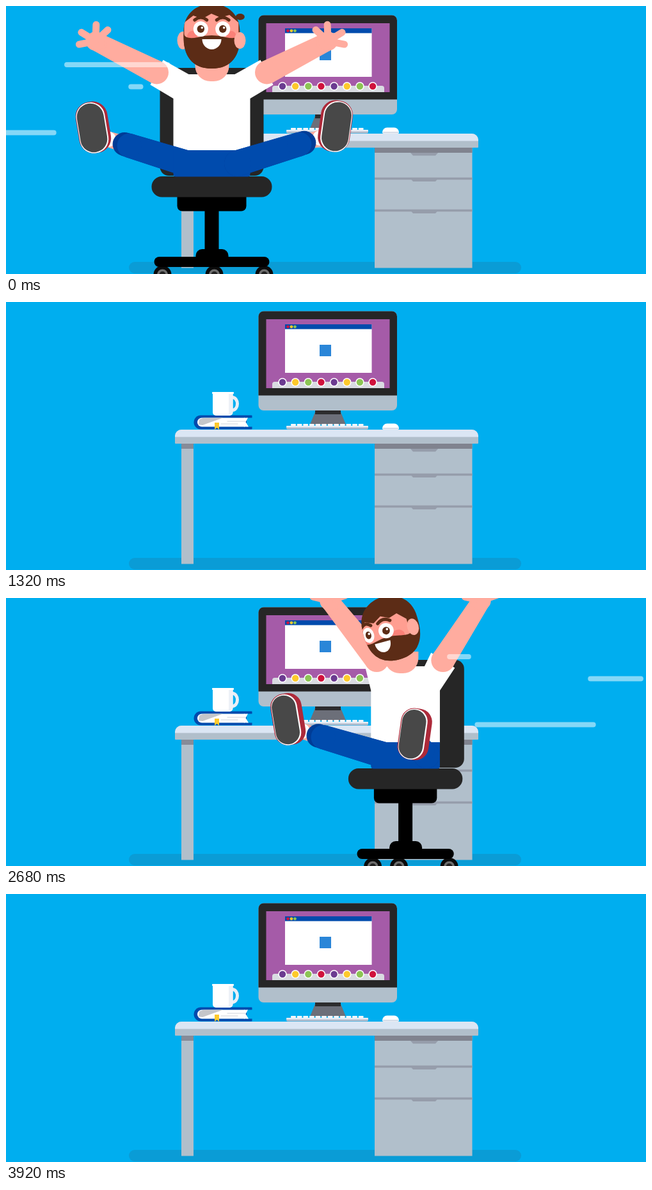
Recreate the animation shown at these times as an HTML page with a canvas. Size 1000x420 px, loop 4000 ms.

```html
<!DOCTYPE html>
<html lang="en">
<head>
<meta charset="utf-8">
<title>Office chair ride</title>
<style>
html, body { margin: 0; width: 100%; height: 100%; overflow: hidden; background: #00aeef; }
canvas { display: block; width: 1000px; height: 420px; }
</style>
</head>
<body>
<canvas id="stage" width="1000" height="420"></canvas>
<script>
const c = document.getElementById('stage').getContext('2d');
const LOOP = 4000, STEP = 40, SPEED = 0.68, SPIN = 0.43, START = 321.5;
const SKIN = '#ffac9f', FACE = '#ff9e91', CHEEK = '#fb8178', HAIR = '#5c2c16';
const JEANS = '#004bad', CUFF = '#003c96', DARK = '#262626', STEEL = '#b1bfcb', EDGE = '#969dab';
const PURPLE = '#6b3b90', YELLOW = '#fdc92c', GREEN = '#8cc454', RED = '#d0123c', SHOE = '#ad2a3a';

// Speed lines, placed relative to the chair
const LINES = [
  { y: 92, start: -157, life: 258, period: 660, from: -380, to: -65 },
  { y: 126.5, start: 30, life: 520, period: 520, from: -380, to: -107 },
  { y: 198.5, start: -40, life: 430, period: 640, from: -340, to: -52 }
];

const rad = d => d * Math.PI / 180;
const mod = (a, b) => ((a % b) + b) % b;

function box(x, y, w, h, r, fill) {
  c.beginPath(); c.roundRect(x, y, w, h, r); c.fillStyle = fill; c.fill();
}
function oval(x, y, rx, ry, fill) {
  c.beginPath(); c.ellipse(x, y, rx, ry, 0, 0, 7); c.fillStyle = fill; c.fill();
}
const disc = (x, y, r, fill) => oval(x, y, r, r, fill);
function poly(pts, fill) {
  c.beginPath(); pts.forEach(p => c.lineTo(...p)); c.closePath(); c.fillStyle = fill; c.fill();
}
function line(x1, y1, x2, y2, w, color) {
  c.beginPath(); c.moveTo(x1, y1); c.lineTo(x2, y2);
  c.lineWidth = w; c.strokeStyle = color; c.lineCap = 'round'; c.stroke();
}
function limb(x1, y1, w1, x2, y2, w2, color) {
  const d = Math.hypot(x2 - x1, y2 - y1) || 1, nx = (y1 - y2) / d / 2, ny = (x2 - x1) / d / 2;
  poly([[x1 + nx * w1, y1 + ny * w1], [x2 + nx * w2, y2 + ny * w2],
    [x2 - nx * w2, y2 - ny * w2], [x1 - nx * w1, y1 - ny * w1]], color);
  disc(x1, y1, w1 / 2, color);
  disc(x2, y2, w2 / 2, color);
}

function drawDesk() {
  box(192, 401, 613, 18, 9, '#0a9cd6');
  box(274, 222, 19, 188.5, 0, STEEL);
  box(274, 222, 19, 8, 0, '#868b98');
  box(576, 222, 152.5, 188.5, 0, STEEL);
  box(576, 222, 152.5, 8, 0, '#80838f');
  for (const y of [230, 270.5, 320.5]) {
    if (y > 230) box(576, y - 1.7, 152.5, 3.4, 0, EDGE);
    poly([[632, y], [675, y], [671, y + 4.5], [636, y + 4.5]], EDGE);
  }
  box(264, 200, 474, 22, [10, 10, 1, 1], STEEL);
  box(264, 200, 474, 11.5, [10, 10, 0, 0], '#dbe6f4');
}

function drawComputer() {
  poly([[484, 170], [522, 170], [531, 192], [475, 192]], '#6c6f79');
  box(483, 170, 40, 6, 0, '#2c2c2e');
  box(394.5, 14.5, 216.5, 155.5, 8, STEEL);
  box(394.5, 14.5, 216.5, 132, [8, 8, 0, 0], DARK);
  box(406.5, 27, 193, 108, 0, '#a55ba8');
  box(436, 35, 135.5, 76, 0, '#fff');
  box(436, 35, 135.5, 7.5, 0, JEANS);
  [RED, YELLOW, GREEN].forEach((f, i) => disc(440.5 + i * 5.5, 38.8, 2.4, f));
  box(490, 67, 18, 18, 0, '#2a86d8');
  box(416, 125, 175, 10, [4, 4, 0, 0], '#d9dbe1');
  for (let i = 0; i < 8; i++) {
    const x = 432 + i * 20.15;
    disc(x, 125.8, 6.8, '#fff');
    disc(x, 125.8, 5.2, [PURPLE, YELLOW, GREEN, RED][i % 4]);
  }
  box(438, 194, 128, 5.5, 2, '#b5bccb');
  box(438, 194, 128, 2.5, 1, '#e7edf6');
  for (let i = 0; i < 12; i++) box(445 + i * 9.6, 191, 8, 3, 1, '#f4f7fb');
  box(588, 190.5, 26, 9.5, [11, 11, 3, 3], '#fff');
  box(589, 197, 24, 2.5, 1, '#d5dce8');
}

function drawBook() {
  box(293.5, 177.5, 91, 22, [11, 1, 1, 11], JEANS);
  box(376, 181.5, 9, 14, 0, '#00aeef');
  box(299, 181.5, 74, 14, [7, 0, 0, 7], '#fff');
  poly([[372, 181.5], [378, 181.5], [374.5, 188], [379, 195.5], [372, 195.5]], '#fff');
  poly([[302, 184], [309, 181.5], [339, 181.5], [307, 193], [301, 192]], '#c4c6ca');
  line(346, 187, 374, 187, 1.3, '#dfe2e8');
  line(336, 191, 362, 191, 1.3, '#dfe2e8');
  poly([[326, 189], [333, 189], [333, 200], [329.5, 197], [326, 200]], YELLOW);
  c.beginPath(); c.ellipse(354, 159.5, 7.5, 10, 0, 0, 7);
  c.lineWidth = 5; c.strokeStyle = '#e9eef6'; c.stroke();
  box(323, 141, 31.5, 37, [1, 1, 5, 5], '#fff');
  box(348, 143, 6.5, 34, [1, 1, 5, 1], '#edf1f7');
  box(322, 141, 34, 3, 1, '#fff');
}

// Body measures for a turn of a radians away from the viewer, facing left
function pose(a) {
  const k = Math.cos(a), s = Math.sin(a);
  const wide = k ** 6, nod = Math.sin(2 * a), lean = Math.max(0, nod), snap = k ** 15;
  const arm = side => ({
    side,
    x: side * (36 + 50 * wide) + 9 * k * lean, y: 104 - 20 * s * s,
    hx: side * (88 + 90 * wide), hy: 57 - 103 * s * s - 18 * nod
  });
  const farX = -187 + 380 * Math.max(0, -snap), sole = 42 - 8 * s;
  return {
    k, s, wide, lean, away: k < -0.1,
    half: 51 + 9 * wide,
    headX: -24 * nod,
    turn: a * 180 / Math.PI - 40 * s ** 8,
    arms: [arm(-1), arm(1)],
    far: { x: farX, y: 191 - 36 * Math.min(0, nod), tilt: farX * 0.05, sole, edge: 4 + 6 * s, hip: -40 * k },
    near: { x: 195 * snap, y: 189 + 76 * s * s, tilt: 8, sole, edge: 8 - 12 * snap, hip: 40 * k }
  };
}

function drawBase({ k, s, wide }) {
  const seat = 87 + 7 * wide, mount = seat - 40, foot = 69 + 21 * wide;
  box(-11, 318, 22, 70, 0, '#000');
  box(-mount, 296, mount * 2, 25.5, [0, 0, 8, 8], '#000');
  box(-25, 381, 51, 20, [10, 10, 0, 0], '#000');
  for (const x of [46 * s - 77, 4 - 25 * s, 82 - 24 * s]) {
    const wx = k < 0 ? -x : x;
    disc(wx, 421, 14, '#0b0b0b');
    disc(wx, 421, 8.5, '#6d6d6d');
    disc(wx, 421, 5, '#222');
  }
  box(-foot, 393, foot * 2, 16, 8, '#000');
  box(-seat, 267, seat * 2, 32.5, 16, DARK);
}

function drawBack({ k, s }) {
  const half = Math.max(14, 81 * Math.abs(k));
  box(44 * s - half, 97, half * 2, 169, 14, DARK);
}

function drawArm({ x, y, hx, hy, side }, away) {
  const dir = Math.atan2(hy - y, hx - x);
  limb(x, y, 37, hx, hy, 29, SKIN);
  const px = hx + Math.cos(dir) * 4, py = hy + Math.sin(dir) * 4;
  disc(px, py, 15, SKIN);
  for (const d of [110, 65, 5, -38]) {
    const g = dir - side * rad(d);
    line(px, py, px + Math.cos(g) * 26, py + Math.sin(g) * 26, 11, SKIN);
  }
  if (away) limb(x, y, 41, x + (hx - x) * 0.12, y + (hy - y) * 0.12, 40, '#fff');
}

function drawTorso({ half, arms, headX }) {
  for (const { x, y, hx, hy, side } of arms) {
    const dir = Math.atan2(hy - y, hx - x), nx = -Math.sin(dir) * 22 * side, ny = Math.cos(dir) * 22 * side;
    poly([[side * half, 145], [x + nx, y + ny], [x - nx, y - ny], [side * (half - 24), 107], [0, 145]], '#fff');
  }
  box(-half, 107, half * 2, 121, [24, 24, 0, 0], '#fff');
  box(headX * 0.3 - 26, 84, 53, 34, [0, 0, 24, 24], SKIN);
}

function drawLeg({ x, y, tilt, sole, edge, hip }, away) {
  const dx = hip - x, dy = 246 - y, d = Math.hypot(dx, dy) || 1;
  const along = n => [x + dx * n / d, y + 10 + (dy - 10) * n / d];
  const reach = Math.min(54, d * 0.5);
  limb(...along(reach * 0.3), 24, ...along(reach), 26, SKIN);
  limb(...along(reach * 0.2), 25, ...along(reach * 0.5), 24, '#fff');
  limb(hip, 246.5, 41, ...along(reach), 37, CUFF);
  limb(hip, 246.5, 41, ...along(reach + 8), 38, JEANS);
  c.save();
  c.translate(x, y);
  c.rotate(rad(tilt));
  box(Math.min(0, edge) - sole / 2 - 2, -41, sole + 4 + Math.abs(edge), 81, sole / 2 + 2, SHOE);
  if (!away) {
    box(-sole / 2 - 1.5 + edge * 0.1, -40, sole + 3, 80, sole / 2 + 1, '#fff');
    box(-sole / 2, -38.5, sole, 77, sole / 2, '#484848');
  }
  c.restore();
}

function drawLegs({ half, far, near, away }) {
  const lap = () => box(-half, 226, half * 2, 41.5, [0, 0, 4, 4], JEANS);
  drawLeg(away ? near : far, away);
  if (!away) lap();
  drawLeg(away ? far : near, away);
  if (away) lap();
}

function drawEye(x, k, squint) {
  if (squint) {
    oval(x, -4, 9 * k, 4.5, '#fff');
    oval(x, -3, 4 * k, 2, HAIR);
  } else {
    oval(x, -12, 12 * k, 12, '#fff');
    oval(x, -12, 6 * k, 6, HAIR);
    disc(x + 2 * k, -14, 1.8, '#fff');
  }
  const y = squint ? -17 : -26;
  c.beginPath(); c.moveTo(x - 10 * k, y);
  c.quadraticCurveTo(x, y - 8, x + 10 * k, y);
  c.lineWidth = 5; c.lineCap = 'round'; c.strokeStyle = HAIR; c.stroke();
}

function drawHead({ headX, turn, lean }, squint) {
  const px = d => 44 * Math.sin(rad(Math.max(-100, Math.min(100, d - turn))));
  const seen = d => Math.cos(rad(d - turn));
  const edge = d => d - turn < -90 ? -50 : px(d);
  c.save();
  c.translate(headX, 48);
  c.rotate(rad(-16 * lean));
  if (turn < 60) oval(px(70) + 3, -31, 7, 5, HAIR);
  if (seen(-90) > -0.1) oval(px(-90) - 1, 6, 9, 14, SKIN);
  c.save();
  c.beginPath();
  c.moveTo(-44, -8);
  c.bezierCurveTo(-44, -66, 44, -66, 44, -8);
  c.bezierCurveTo(46, 26, 34, 50, 0, 50);
  c.bezierCurveTo(-34, 50, -46, 26, -44, -8);
  c.fillStyle = HAIR; c.fill(); c.clip();
  c.translate(0, 14 * lean);
  if (turn < 165) {
    const l = edge(-78), r = edge(72), w = r - l;
    const fringe = [-22, -33, -28, -36, -30, -34, -22].map((y, i) => [l + w * i / 6, y]);
    poly([...fringe, [r, 12], [l, 12]], FACE);
    for (const d of [-44, 44]) if (seen(d) > 0) oval(px(d), 0, 11 * Math.max(0.4, seen(d)), 9, CHEEK);
    const b = edge(-82), e = edge(82);
    c.beginPath();
    c.moveTo(b, -4);
    c.quadraticCurveTo(b + 3, 5, b + (e - b) * 0.25, 1);
    c.quadraticCurveTo((b + e) / 2, -5, b + (e - b) * 0.75, 1);
    c.quadraticCurveTo(e - 3, 5, e, -4);
    c.lineTo(e, 60); c.lineTo(b, 60); c.fillStyle = HAIR; c.fill();
    for (const d of [-23, 23]) {
      if (seen(d) > -0.15) drawEye(px(d), Math.max(0.4, Math.sqrt(Math.max(0, seen(d)))), squint);
    }
    if (seen(0) > 0.1) {
      c.beginPath();
      c.ellipse(px(0) * 0.75, 4, 15 * Math.max(0.7, seen(0)), 16, 0, 0, Math.PI);
      c.fillStyle = '#fff'; c.fill();
    }
  }
  c.restore();
  if (seen(90) > -0.1) oval(px(90) - 3 * lean, 6, 9, 13, SKIN);
  c.restore();
}

function drawLines(time) {
  for (const { y, start, life, period, from, to } of LINES) {
    const p = mod(time - start, period) / life;
    if (p >= 1) continue;
    const head = from + (to - from) * (1 - (1 - Math.min(1, p * 2)) ** 2);
    const tail = from + (to - from) * p ** 1.5;
    if (head - tail > 2) box(tail, y - 4, head - tail, 8, 4, 'rgba(255,255,255,.52)');
  }
}

function drawMan(p, squint) {
  if (p.away) drawLegs(p);
  drawBase(p);
  if (!p.away) drawBack(p);
  drawTorso(p);
  p.arms.forEach(arm => drawArm(arm, p.away));
  if (!p.away) drawLegs(p);
  drawHead(p, squint);
  if (p.away) drawBack(p);
}

function ride(time) {
  const turn = mod(SPIN * time + 180, 360) - 180;
  c.save();
  c.translate(START + SPEED * time, 0);
  c.save();
  if (turn > 0) c.scale(-1, 1);
  drawMan(pose(rad(Math.abs(turn))), time > 400);
  c.restore();
  drawLines(time);
  c.restore();
}

function draw(t) {
  box(0, 0, 1000, 420, 0, '#00aeef');
  drawDesk();
  drawComputer();
  drawBook();
  if (t < 1320) ride(t);
  else if (t >= 1800 && t < 3920) {
    c.save();
    c.translate(1000, 0);
    c.scale(-1, 1);
    ride(t - 2600);
    c.restore();
  }
}

function tick() {
  draw(Math.floor(performance.now() % LOOP / STEP) * STEP);
  requestAnimationFrame(tick);
}
tick();
</script>
</body>
</html>
```
